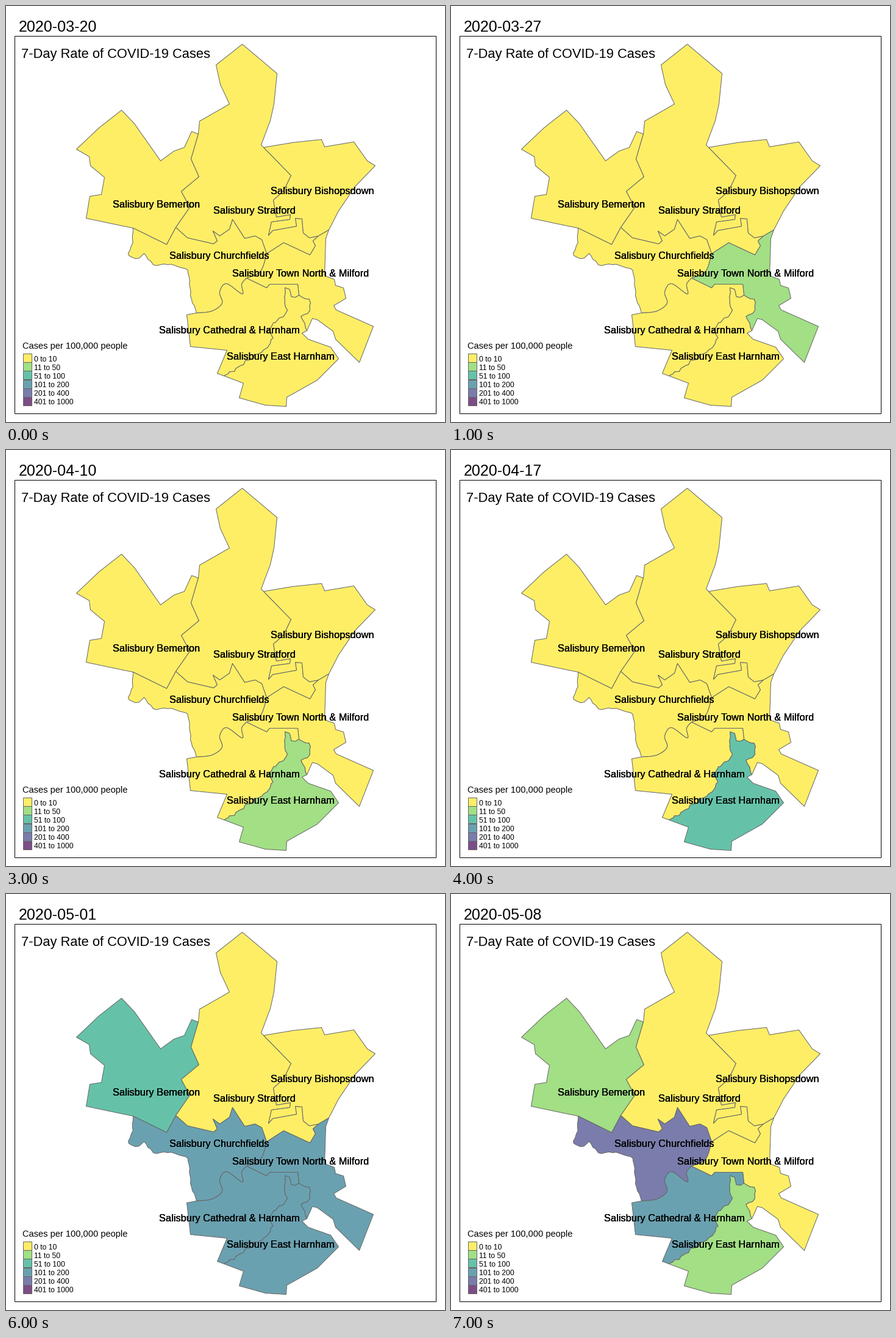
Recreate the animation shown at these times as a matplotlib script. Size 720 px wide and 681 px high, loop 8 s.

```python
import matplotlib.pyplot as plt
import numpy as np
from matplotlib.animation import FuncAnimation
from matplotlib.patches import Polygon, Rectangle

W, H, DPI = 720, 681, 64
PX = 72 / DPI  # points per pixel
EDGE = "#666666"
WEEKS = 8
START = np.datetime64("2020-03-20")
LIMITS = [0, 10, 50, 100, 200, 400, 1000]

plt.rcParams["font.family"] = "Liberation Sans"

# Reversed viridis at 70 % opacity on white
COLORS = 0.7 * plt.get_cmap("viridis")(np.linspace(1, 0, 6))[:, :3] + 0.3


def line(*pts):
    return np.array(pts, float)


def curve(*pts, steps=8):
    """Smooth Catmull-Rom line through the points."""
    p = np.array([pts[0], *pts, pts[-1]], float)
    t = np.linspace(0, 1, steps, endpoint=False)[:, None]
    parts = [b + t / 2 * (c - a + t * (2 * a - 5 * b + 4 * c - d
                                       + t * (3 * (b - c) + d - a)))
             for a, b, c, d in zip(p, p[1:], p[2:], p[3:])]
    return np.vstack([*parts, p[-1:]])


def jagged(*pts, size=1.5, step=6, seed=1):
    """Line through the points with small random kinks."""
    p = np.array(pts, float)
    run = np.r_[0, np.cumsum(np.hypot(*np.diff(p, axis=0).T))]
    s = np.linspace(0, run[-1], int(run[-1] / step) + 1)
    out = np.c_[np.interp(s, run, p[:, 0]), np.interp(s, run, p[:, 1])]
    out[1:-1] += np.random.default_rng(seed).uniform(
        -size, size, out[1:-1].shape)
    return out


def ring(*arcs):
    """Chain arcs into one outline, flipping those that run backwards."""
    pts = arcs[0]
    for arc in arcs[1:]:
        forward = np.allclose(arc[0], pts[-1])
        pts = np.vstack([pts, arc if forward else arc[::-1]])
    return pts + 0.5  # pixel centres


# Boundaries, each running from one junction to the next
stratford_outer = line(
    (315, 209), (317, 188), (366, 160), (351, 128), (344, 96), (387, 62),
    (444, 110), (439, 160), (433, 187), (418, 227), (422, 231))
stratford_bishopsdown = line(
    (422, 231), (467, 277), (455, 302), (443, 313), (438, 317), (443, 345),
    (466, 341), (465, 349), (435, 353), (430, 375), (437, 367), (476, 360),
    (474, 347), (485, 348), (487, 371), (497, 379), (512, 376))
bishopsdown_milford = line((512, 376), (529, 366))
bishopsdown_outer = line(
    (422, 231), (470, 223), (517, 218), (522, 230), (570, 222), (592, 253),
    (605, 261), (572, 295), (545, 335), (529, 366))
stratford_milford = line(
    (512, 376), (503, 384), (507, 392), (498, 407), (455, 387), (427, 405))
stratford_churchfields = line(
    (427, 405), (419, 382), (408, 376), (391, 380), (371, 349), (366, 365),
    (350, 376), (339, 368), (346, 384), (340, 389), (297, 379), (278, 362))
bemerton_stratford = line(
    (278, 362), (301, 329), (287, 303), (316, 279), (303, 250), (315, 209))
bemerton_outer = line(
    (315, 209), (304, 205), (292, 231), (275, 237), (253, 253), (210, 192),
    (189, 170), (152, 199), (115, 234), (136, 246), (138, 261), (161, 280),
    (156, 308), (137, 311), (131, 347), (188, 359), (208, 363))
bemerton_churchfields = line((208, 363), (263, 390), (278, 362))
churchfields_outer = jagged(
    (208, 363), (207, 388), (199, 407), (215, 415), (225, 404), (242, 424),
    (267, 422), (298, 430), (303, 478), (312, 502), size=1)
churchfields_cathedral = curve(
    (312, 502), (337, 499), (354, 486), (350, 468), (361, 454), (387, 471),
    (386, 455), (394, 445))
churchfields_milford = curve((394, 445), (417, 434), (427, 405))
cathedral_milford = line(
    (394, 445), (427, 461), (432, 455), (478, 455), (480, 473))
cathedral_east = jagged(
    (480, 473), (470, 475), (465, 464), (456, 463), (460, 500), (427, 530),
    (437, 541), (428, 558), (388, 586), (357, 605), size=2.5)
cathedral_outer = line(
    (312, 502), (296, 505), (302, 557), (362, 563), (346, 601), (357, 605))
east_milford = jagged(
    (480, 473), (498, 480), (497, 501), (484, 507), (493, 531))
east_outer = line(
    (493, 531), (485, 535), (495, 545), (532, 558), (545, 577), (510, 612),
    (460, 640), (459, 655), (425, 653), (382, 641), (389, 617), (357, 605))
milford_outer = line(
    (529, 366), (524, 380), (522, 441), (538, 447), (540, 457), (553, 461),
    (557, 478), (537, 490), (541, 497), (602, 524), (579, 583), (540, 545),
    (536, 532), (510, 513), (502, 511), (493, 531))

# Name, label centre and baseline, class in each week, outline
REGIONS = [
    ("Bemerton", (246.5, 330), "00000121", ring(
        bemerton_outer, bemerton_churchfields, bemerton_stratford)),
    ("Stratford", (407, 340), "00000000", ring(
        stratford_outer, stratford_bishopsdown, stratford_milford,
        stratford_churchfields, bemerton_stratford)),
    ("Bishopsdown", (518.5, 308), "00000100", ring(
        stratford_bishopsdown, bishopsdown_milford, bishopsdown_outer)),
    ("Churchfields", (349.5, 414), "00000234", ring(
        churchfields_outer, churchfields_cathedral, churchfields_milford,
        stratford_churchfields, bemerton_churchfields)),
    ("Town North & Milford", (483.5, 443), "01100230", ring(
        bishopsdown_milford, milford_outer, east_milford, cathedral_milford,
        churchfields_milford, stratford_milford)),
    ("Cathedral & Harnham", (366, 536), "00000333", ring(
        churchfields_cathedral, cathedral_milford, cathedral_east,
        cathedral_outer)),
    ("East Harnham", (450, 579), "00012331", ring(
        cathedral_east, east_outer, east_milford)),
]

fig = plt.figure(figsize=(W / DPI, H / DPI), dpi=DPI, facecolor="white")
ax = fig.add_axes([0, 0, 1, 1])
ax.set_xlim(0, W)
ax.set_ylim(H, 0)
ax.axis("off")


def write(x, y, text, size, ha="left"):
    return ax.text(x, y, text, fontsize=size * PX, ha=ha, va="baseline",
                   color="black", zorder=5)


def outlined(patch, edge=EDGE):
    patch.set(edgecolor=edge, linewidth=PX)
    return ax.add_patch(patch)


outlined(Rectangle((14, 49), 691, 618, fill=False), "black")
date = write(21, 42, "", 25)
write(25, 85, "7-Day Rate of COVID-19 Cases", 21.9)

shapes = []
for name, (x, y), _, outline in REGIONS:
    shapes.append(outlined(Polygon(outline, joinstyle="round")))
    for _ in range(3):  # overprinting makes the labels heavier
        write(x, y, "Salisbury " + name, 16.33, "center")

write(27, 561, "Cases per 100,000 people", 14.6)
for i, color in enumerate(COLORS):
    top = 569 + 14.17 * i
    low = LIMITS[i] + (i > 0)
    outlined(Rectangle((28, round(top)), 14, 14, facecolor=color))
    write(46, top + 12.5, f"{low} to {LIMITS[i + 1]}", 12.25)


def update(week):
    date.set_text(str(START + 7 * week))
    for shape, (_, _, classes, _) in zip(shapes, REGIONS):
        shape.set_facecolor(COLORS[int(classes[week])])
    return [date, *shapes]


anim = FuncAnimation(fig, update, frames=WEEKS, interval=1000,
                     repeat=True, repeat_delay=0)
plt.show()
```
